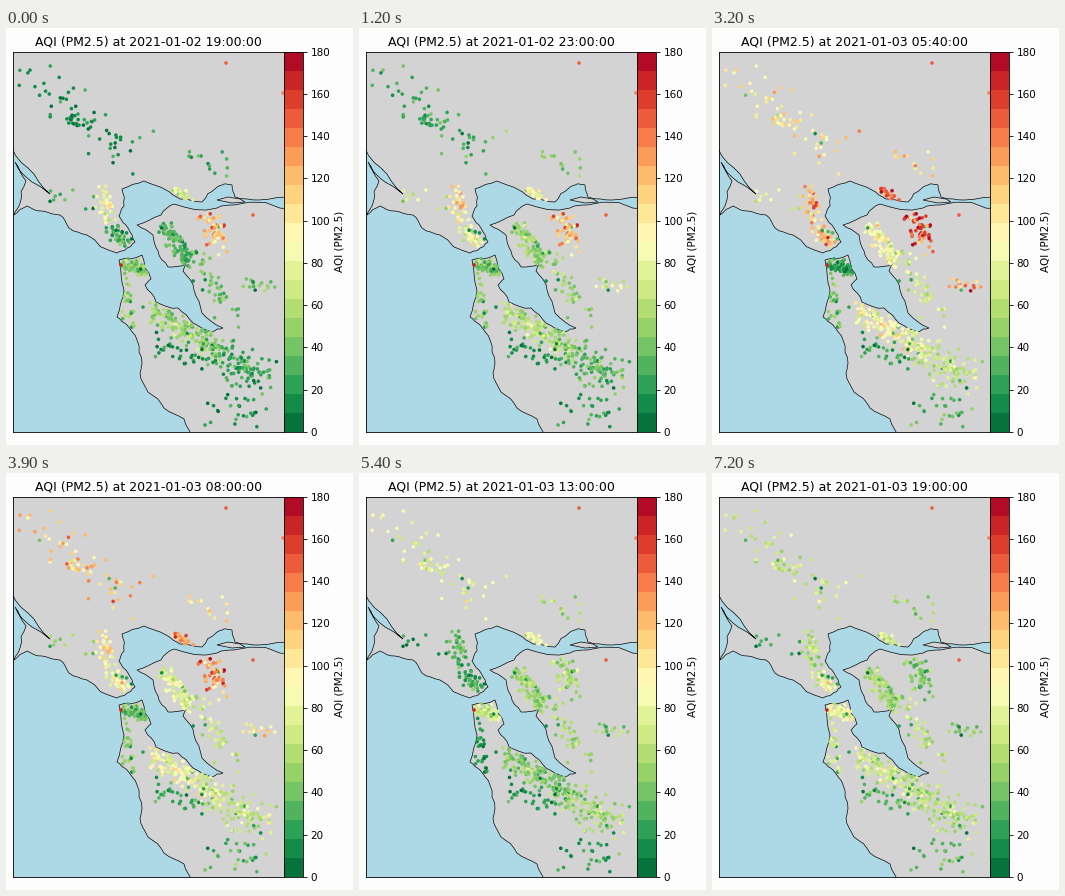
Animation of 347x417 px, one loop 7300 ms. Source, as a matplotlib script:

```python
import numpy as np
import matplotlib.pyplot as plt
from matplotlib.animation import FuncAnimation
from matplotlib.cm import ScalarMappable
from matplotlib.colors import ListedColormap, Normalize
from matplotlib.patches import Polygon
from matplotlib.path import Path

W, H, DPI = 347, 417, 75
FRAMES, STEP_MS, STEP_MIN = 73, 100, 20
LEFT, SPLIT, RIGHT, TOP, BOTTOM = 7.2, 278, 297.4, 23.6, 403.8
PAPER = "#fdfdfd"
rng = np.random.default_rng(21)

# Key points of the two shores in stage pixels, y pointing down
NORTH_SHORE = [
    (0, 113), (22, 140), (44, 166), (26, 154), (9, 134), (20, 153), (14, 175),
    (8, 187), (21, 178), (36, 183), (54, 187), (63, 200), (81, 207),
    (111, 225), (119, 222), (129, 214), (122, 200), (113, 188), (118, 178),
    (116, 161), (138, 153), (160, 162), (174, 171), (196, 174), (210, 160),
    (218, 156), (226, 157), (229, 169), (253, 172), (290, 168)]
SOUTH_SHORE = [
    (290, 181), (228, 177), (211, 180), (168, 176), (155, 187), (131, 197),
    (147, 207), (152, 223), (162, 239), (180, 236), (177, 243), (188, 262),
    (196, 285), (217, 300), (206, 304), (187, 295), (172, 280), (150, 274),
    (139, 257), (145, 251), (136, 227), (113, 232), (118, 262), (111, 289),
    (121, 297), (131, 312), (136, 336), (134, 345), (142, 364), (158, 380),
    (178, 391), (187, 410)]

# Axis of each cluster, spread, count | start, end, night rise, its peak, dip
CLUSTERS = [
    ((22, 45), (130, 128), 13, 50, 14, 65, 72, 38, 0.0),     # north-west
    ((62, 87), (79, 97), 4, 18, 14, 65, 72, 38, 0.0),
    ((160, 112), (222, 140), 11, 14, 28, 55, 75, 32, 0.0),   # north-east
    ((20, 168), (88, 175), 5, 10, 17, 28, 85, 22, 0.4),      # far west
    ((97, 164), (104, 194), 4, 38, 84, 64, 62, 26, 0.5),     # bay, north side
    ((102, 199), (123, 215), 4, 42, 20, 78, 85, 24, 0.6),
    ((167, 162), (186, 172), 2.5, 20, 72, 72, 75, 32, 0.0),  # strait
    ((202, 184), (212, 213), 6, 58, 118, 44, 70, 32, 0.2),   # inland heat
    ((158, 199), (184, 234), 4.5, 95, 28, 52, 50, 29, 0.0),  # east bay
    ((188, 225), (228, 290), 8, 44, 38, 66, 25, 28, 0.1),    # valley
    ((232, 252), (276, 261), 4, 16, 36, 44, 95, 28, 0.0),    # far east
    ((120, 237), (138, 241), 4, 62, 48, 84, -40, 30, 0.0),   # city
    ((119, 252), (124, 300), 4, 28, 50, 70, -15, 30, 0.7),   # coast
    ((146, 280), (214, 324), 5, 155, 50, 68, 28, 32, 0.35),  # peninsula
    ((204, 322), (262, 350), 9, 105, 26, 62, 25, 33, 0.0),   # south bay
    ((152, 310), (192, 334), 8, 32, 15, 34, 4, 30, 0.3),     # hills
    ((200, 385), (245, 380), 9, 26, 15, 34, 8, 30, 0.3)]

# Sensors that barely change: x, y, value
STEADY = np.array([(220, 35, 145), (277, 65, 140), (115, 237, 165),
                   (247, 187, 150)])


def roughen(points, rounds=2, amount=0.09):
    """Make a shoreline jagged by shifting the middle of each edge."""
    line = np.array(points, float)
    for _ in range(rounds):
        edge = np.diff(line, axis=0)
        normal = np.column_stack([-edge[:, 1], edge[:, 0]])
        shift = rng.uniform(-amount, amount, (len(edge), 1))
        middle = line[:-1] + edge / 2 + normal * shift
        line = np.insert(line, np.arange(1, len(line)), middle, axis=0)
    return line


def on_land(p):
    return (LEFT + 2 < p[0] < SPLIT - 2 and TOP + 3 < p[1] < BOTTOM - 3
            and any(Path(shape).contains_point(p) for shape in LAND))


def scatter_cluster(start, end, spread, count):
    start, end = np.array(start), np.array(end)
    found = []
    while len(found) < count:
        p = start + rng.random() * (end - start) + rng.normal(0, spread, 2)
        if on_land(p):
            found.append(p)
    return found


LAND = [np.vstack([roughen(NORTH_SHORE), [(290, 0), (0, 0)]]),
        np.vstack([roughen(SOUTH_SHORE), [(290, 410)]])]
ISLAND = [(211, 172), (222, 169), (234, 171), (239, 174), (226, 175)]

places = np.vstack([scatter_cluster(*c[:4]) for c in CLUSTERS])
trends = np.repeat([c[4:] for c in CLUSTERS], [c[3] for c in CLUSTERS], axis=0)
total = len(places)
gain = rng.normal(1, 0.15, total)
gain[rng.random(total) < 0.04] = 0.3
offset = rng.normal(0, 7, total)
phase = rng.uniform(0, 2 * np.pi, total)
pace = rng.integers(3, 9, total)
order = rng.permutation(total)
positions = np.vstack([places[order], STEADY[:, :2]])


def bell(x, width):
    return np.exp(-(x / width) ** 2)


def readings(frame):
    """Drift from start to end, with a night bump and an afternoon dip."""
    start, end, rise, peak, dip = trends.T
    level = start + (end - start) * frame / (FRAMES - 1)
    level = level + rise * bell(frame - peak, 16)
    level = level * (1 - dip * bell(frame - 54, 8))
    wobble = 5 * np.sin(2 * np.pi * pace * frame / FRAMES + phase)
    values = np.clip(level * gain + offset + wobble, 3, 176)
    return np.concatenate([values[order], STEADY[:, 2]])


def title_text(frame):
    day, minutes = divmod(19 * 60 + STEP_MIN * frame, 1440)
    hour, minute = divmod(minutes, 60)
    return f"AQI (PM2.5) at 2021-01-{2 + day:02d} {hour:02d}:{minute:02d}:00"


def pixel_axes(left, right):
    return fig.add_axes([left / W, 1 - BOTTOM / H,
                         (right - left) / W, (BOTTOM - TOP) / H])


plt.rcParams["font.family"] = "DejaVu Sans"
fig = plt.figure(figsize=((W + 1e-6) / DPI, (H + 1e-6) / DPI), dpi=DPI,
                 facecolor=PAPER)
ax = pixel_axes(LEFT, SPLIT)
ax.set(xlim=(LEFT, SPLIT), ylim=(BOTTOM, TOP), xticks=[], yticks=[],
       facecolor="lightblue")
for outline in [*LAND, ISLAND]:
    ax.add_patch(Polygon(outline, facecolor="lightgray", edgecolor="black",
                         linewidth=0.65, zorder=1))

bands = 20
cmap = ListedColormap(plt.get_cmap("RdYlGn_r")((np.arange(bands) + 0.5) / bands))
norm = Normalize(0, 180)
dots = ax.scatter(*positions.T, c=readings(0), s=12, cmap=cmap, norm=norm,
                  linewidths=0, zorder=2)
title = ax.set_title(title_text(0), fontsize=12)

bar = fig.colorbar(ScalarMappable(norm, cmap), cax=pixel_axes(SPLIT, RIGHT),
                   ticks=range(0, 181, 20))
bar.set_label("AQI (PM2.5)", fontsize=10)


def update(frame):
    dots.set_array(readings(frame))
    title.set_text(title_text(frame))
    return dots, title


anim = FuncAnimation(fig, update, frames=FRAMES, interval=STEP_MS,
                     repeat=True, repeat_delay=0, blit=False)
plt.show()
```
